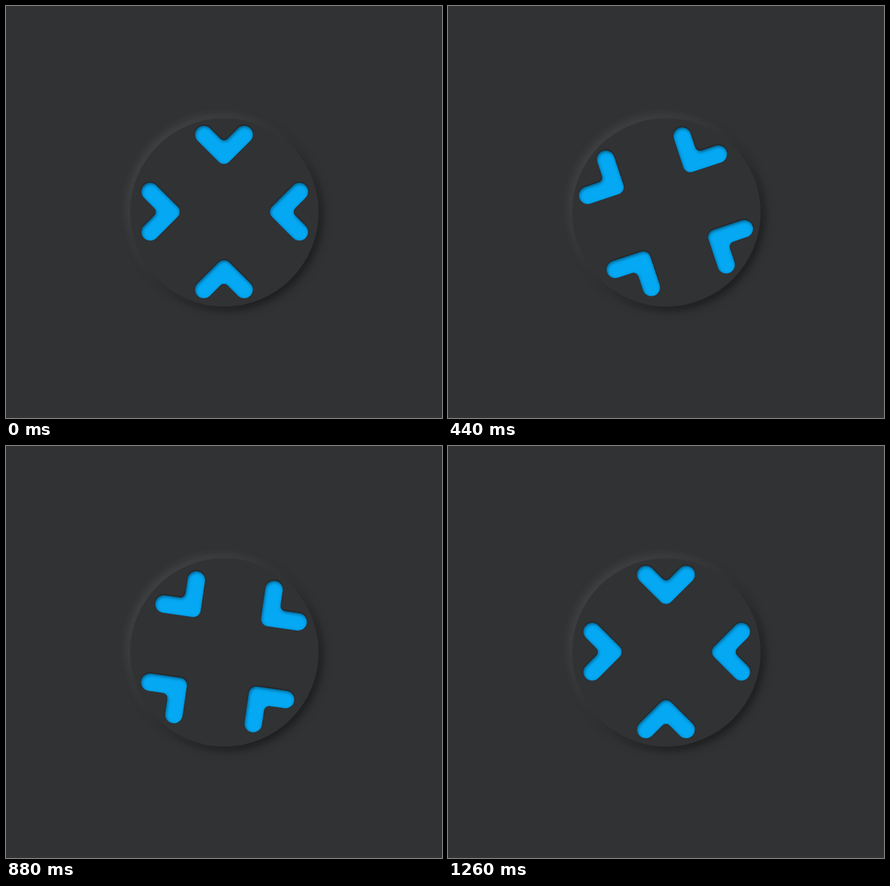
An HTML page with a canvas that plays this animation: 692 px wide and 654 px high, repeating every 1280 ms.

```html
<!DOCTYPE html>
<html lang="en">
<head>
<meta charset="utf-8">
<title>Rotating chevrons</title>
<style>
  html, body { margin: 0; width: 100%; height: 100%; overflow: hidden; background: #313234; }
  canvas { display: block; }
</style>
</head>
<body>
<canvas id="stage" width="692" height="654"></canvas>
<script>
const W = 692, H = 654;
const LOOP = 1280, STEP = 20;
const DEG_PER_MS = 0.144;
const BASE = '#313234', BLUE = '#05a8f3';

// Two opposite pairs, each turning about its own slightly offset centre.
const PAIRS = [
  { x: 345.9, y: 327, radius: 123, turn: 0 },
  { x: 347.2, y: 326.6, radius: 118.4, turn: Math.PI / 2 }
];

const ctx = document.getElementById('stage').getContext('2d');

function chevronPath() {
  const span = 32, r = 14, d = r * Math.SQRT1_2, q = Math.PI / 4;
  const path = new Path2D();
  path.moveTo(-span - d, d);
  path.arc(-span, 0, r, 3 * q, 7 * q);
  path.arcTo(0, span - 2 * d, span - d, -d, 8);
  path.arc(span, 0, r, 5 * q, 9 * q);
  path.arcTo(0, span + 2 * d, -span - d, d, 12);
  path.closePath();
  return path;
}

const chevron = chevronPath();
const surround = new Path2D();
surround.rect(-150, -150, 300, 300);
surround.addPath(chevron);

function setShadow(color, x, y, blur) {
  ctx.shadowColor = color;
  ctx.shadowOffsetX = x;
  ctx.shadowOffsetY = y;
  ctx.shadowBlur = blur;
}

function drawPlate() {
  ctx.fillStyle = BASE;
  ctx.fillRect(0, 0, W, H);
  ctx.fillStyle = '#353335';
  ctx.fillRect(0, 650, W, 4);

  ctx.save();
  ctx.fillStyle = BASE;
  ctx.beginPath();
  ctx.arc(346.5, 327.5, 149.5, 0, 2 * Math.PI);
  setShadow('rgba(0,0,0,0.5)', 5, 5, 15);
  ctx.fill();
  setShadow('rgba(255,255,255,0.1)', -5, -5, 15);
  ctx.fill();
  ctx.restore();
}

function drawChevron(pair, angle) {
  ctx.save();
  ctx.translate(pair.x, pair.y);
  ctx.rotate(angle);
  ctx.translate(0, -pair.radius);

  ctx.fillStyle = BLUE;
  setShadow('rgba(0,0,0,0.5)', 0, -1, 2);
  ctx.fill(chevron);

  // Inset shade along the upper edges, independent of rotation.
  ctx.clip(chevron);
  ctx.fillStyle = BASE;
  setShadow('rgba(0,0,0,0.5)', 1, 2, 5);
  ctx.fill(surround, 'evenodd');
  ctx.restore();
}

function render(now) {
  const t = Math.floor((now % LOOP) / STEP) * STEP;
  const spin = -Math.min(t * DEG_PER_MS, 180) * Math.PI / 180;
  drawPlate();
  for (const pair of PAIRS) {
    drawChevron(pair, spin + pair.turn);
    drawChevron(pair, spin + pair.turn + Math.PI);
  }
}

const start = performance.now();
function tick() {
  render(performance.now() - start);
  requestAnimationFrame(tick);
}
tick();
</script>
</body>
</html>
```
